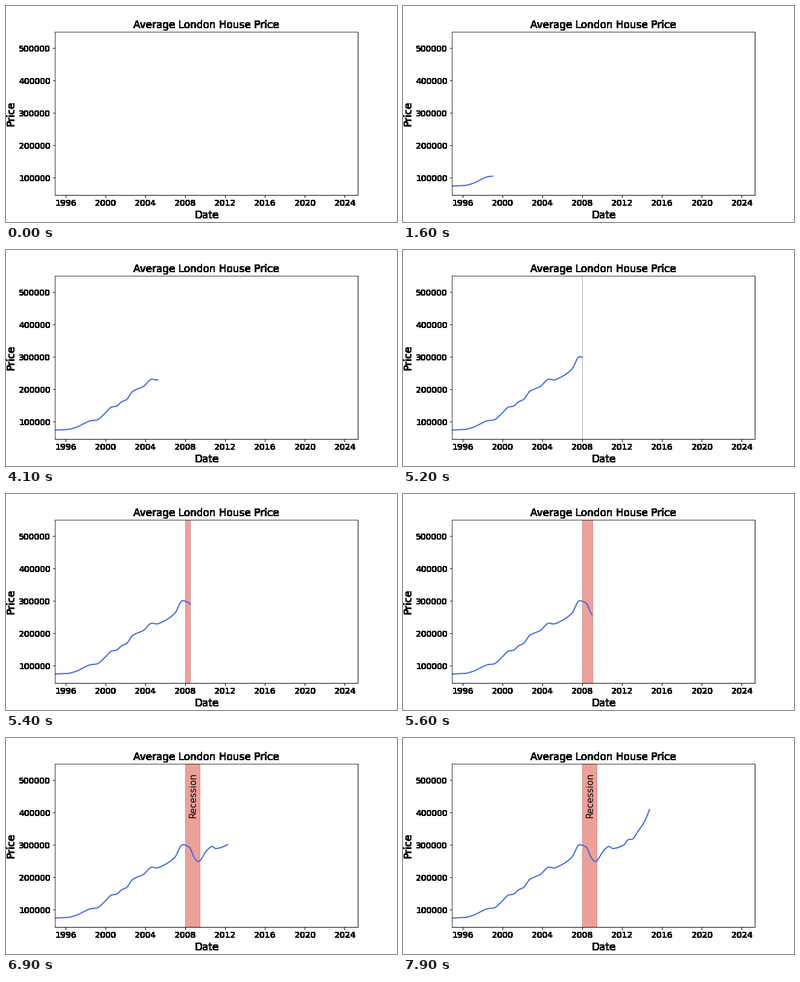
A matplotlib script that plays this animation: 648x360 px, repeating every 8000 ms.

```python
import matplotlib.pyplot as plt
import numpy as np
from matplotlib.animation import FuncAnimation
from matplotlib.patches import Rectangle

FRAMES, INTERVAL = 80, 100
START, SLUMP, SLUMP_END = 1995.0, 2008.0, 2009.47

# Turning points of the curve: year, price in thousands
TURNS = [
    (1995, 74.8), (1996.2, 76.5), (1997, 82.6), (1998.6, 104), (1999.1, 105.6),
    (2000, 128), (2000.6, 145.5), (2001.1, 148.3), (2001.6, 161.5),
    (2002.1, 168.7), (2002.75, 194.5), (2003.8, 209.2), (2004.65, 231.7),
    (2005.1, 229.2), (2005.8, 237), (2006.95, 262), (2007.72, 301),
    (2008.4, 293.5), (2008.9, 261.5), (2009.3, 249), (2010.2, 284.5),
    (2010.7, 295.6), (2011.05, 289.3), (2012.2, 300.5), (2012.6, 316.3),
    (2013.05, 318.5), (2013.5, 338), (2014.3, 375.5), (2014.75, 409.5),
]


def smooth(x, points):
    """Cubic curve through the points that never overshoots a turn."""
    px, py = np.array(points).T
    h = np.diff(px)
    s = np.diff(py) / h
    a, b = s[:-1], s[1:]
    same = a * b > 0
    inner = np.where(same, 2 * a * b / np.where(same, a + b, 1), 0)
    m = np.r_[s[0], inner, s[-1]]
    k = np.clip(np.searchsorted(px, x, side="right") - 1, 0, len(h) - 1)
    t = (x - px[k]) / h[k]
    ease = t * t * (3 - 2 * t)
    bend = t * (1 - t) * h[k] * (m[k] * (1 - t) - m[k + 1] * t)
    return py[k] * (1 - ease) + py[k + 1] * ease + bend


def harden(image, dpi):
    """Make every touched pixel opaque, which gives heavy, jagged lettering."""
    image = image.copy()
    image[..., 3] = image[..., 3] > 0
    return image, 0, 0


years = START + np.arange(3 * FRAMES - 2) / 12
prices = 1000 * smooth(years, TURNS)

plt.rcParams.update({"font.size": 14, "font.family": "DejaVu Sans",
                     "axes.titlesize": 17, "axes.labelsize": 17})
fig, ax = plt.subplots(figsize=(9, 5), dpi=72, facecolor="white")
fig.subplots_adjust(left=0.125, right=0.9, bottom=0.125, top=0.88)

ax.set_xlim(1994.915, 2025.33)
ax.set_ylim(47000, 550300)
ax.set_xticks(range(1996, 2025, 4))
ax.set_yticks(range(100000, 500001, 100000))
ax.ticklabel_format(style="plain", useOffset=False)
ax.set_title("Average London House Price")
ax.set_xlabel("Date")
ax.set_ylabel("Price")
for part in (ax.xaxis, ax.yaxis, ax.title,
             ax.spines["bottom"], ax.spines["right"]):
    part.set_agg_filter(harden)

line, = ax.plot([], [], color="royalblue", lw=2)
band = ax.add_patch(Rectangle((SLUMP, 0), 0, 1, facecolor="#eca09a", lw=1,
                              transform=ax.get_xaxis_transform(), zorder=1))
label = ax.text(2009.04, 383700, "Recession", fontsize=15, rotation=90,
                rotation_mode="anchor", ha="left", va="baseline")


def update(i):
    now = START + i / 4
    n = 3 * i + 1
    line.set_data(years[:n], prices[:n])

    width = min(now, SLUMP_END) - SLUMP
    band.set_visible(width >= 0)
    band.set_width(max(width, 0))
    band.set_edgecolor("#dc8e87" if width > 0 else "#b3b3b3")
    label.set_visible(now >= SLUMP_END)
    return line, band, label


anim = FuncAnimation(fig, update, frames=FRAMES, interval=INTERVAL,
                     init_func=lambda: update(0), repeat=True, repeat_delay=0)
plt.show()
```
